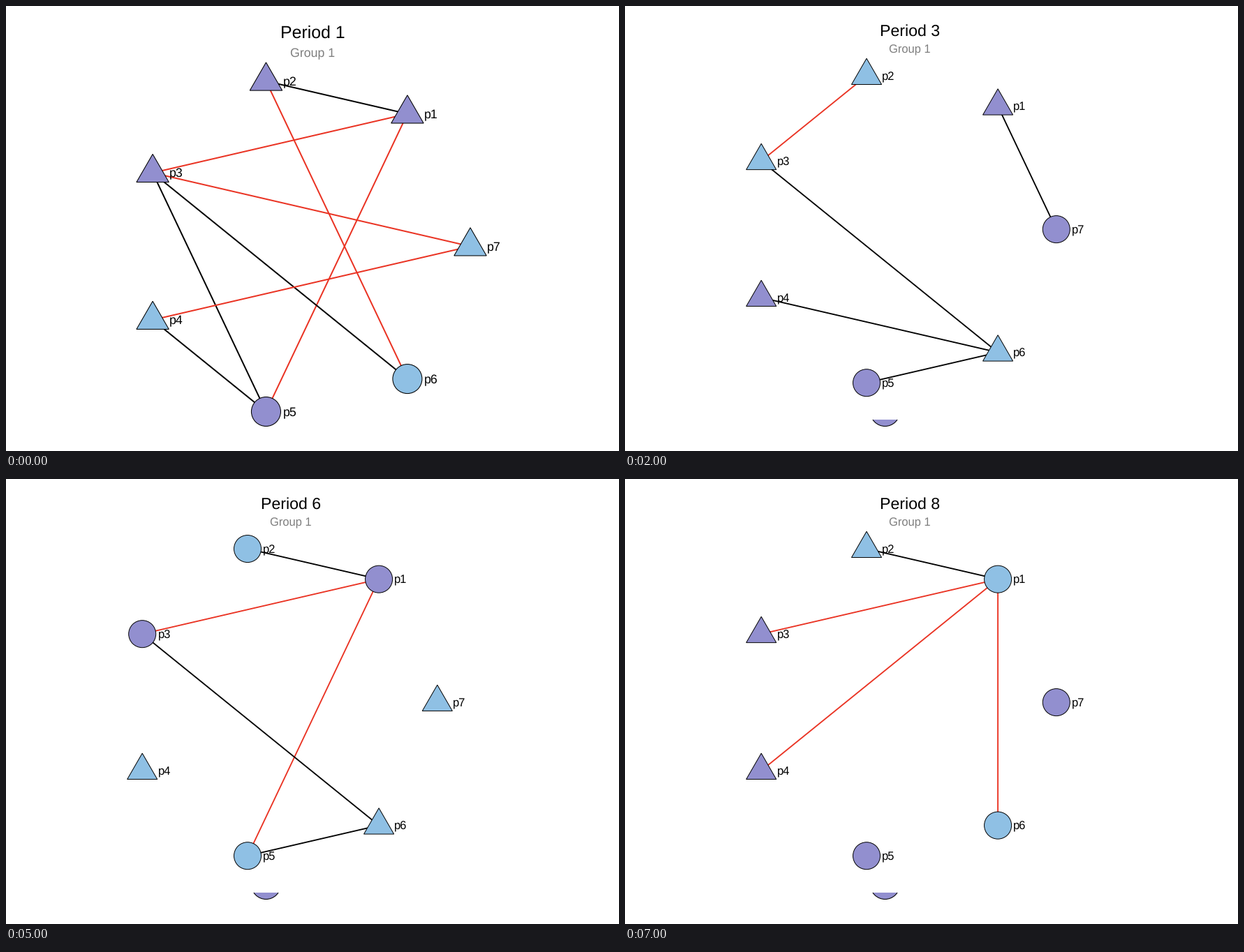
A matplotlib script for the animation above (8000 ms loop, 878 by 638 pixels).

```python
import numpy as np
import matplotlib.pyplot as plt
from matplotlib.animation import ArtistAnimation
from matplotlib.patches import Circle, Polygon, Rectangle

W, H, DPI = 878, 638, 64
PT = 72 / DPI                     # points per pixel
SMALL = 0.929                     # later periods are drawn at this scale
CENTER, RADIUS = (425.7, 344.6), (239.3, 243)
FILL = {"p": "#928fcf", "b": "#8fc0e4"}
RED = "#ea3323"
BLACK_PAIRS = {"12", "17", "35", "36", "45", "46", "56"}

# Nodes p1..p7: p purple, b blue; capital = triangle, small = circle.
PERIODS = [
    ("PPPBpbB", "12 13 15 26 35 36 37 45 47"),
    ("PbPPPPB", "23 24 46"),
    ("PBBPpBp", "17 23 36 46 56"),
    ("PBBpPBP", "17 23 26 36 45 56 57"),
    ("bppBbBb", "12 13 15 24 25 36 37 67"),
    ("pbpBbBB", "12 13 15 36 56"),
    ("pbPpPBB", "12 24 36 37 47"),
    ("bBPPpbp", "12 13 14 16"),
]

plt.rcParams["font.family"] = "Liberation Sans"
plt.rcParams["text.hinting"] = "none"

fig = plt.figure(figsize=(W / DPI, H / DPI), dpi=DPI, facecolor="white")
ax = fig.add_axes([0, 0, 1, 1])
ax.set_xlim(0, W)
ax.set_ylim(H, 0)
ax.axis("off")


def position(k, s):
    a = 2 * np.pi * k / 7
    return (s * (CENTER[0] + RADIUS[0] * np.cos(a)),
            s * (CENTER[1] - RADIUS[1] * np.sin(a)))


def text(x, y, label, size, s, color="black", ha="center"):
    return ax.text(s * x, s * y, label, fontsize=s * size * PT, color=color,
                   ha=ha, va="baseline", zorder=4)


def edge(pair, s):
    (x0, y0), (x1, y1) = (position(int(c), s) for c in pair)
    color = "black" if pair in BLACK_PAIRS else RED
    return ax.plot([x0, x1], [y0, y1], color=color, lw=2 * s * PT,
                   snap=False, zorder=1)[0]


def node(k, kind, s):
    x, y = position(k, s)
    style = dict(facecolor=FILL[kind.lower()], edgecolor="black",
                 lw=1.05 * s * PT, zorder=2)
    if kind.islower():
        shape = Circle((x, y), 21 * s, **style)
    else:
        a = np.radians([-90, 30, 150])
        corners = np.column_stack([x + 26.8 * s * np.cos(a),
                                   y + 26.8 * s * np.sin(a)])
        shape = Polygon(corners, joinstyle="miter", **style)
    return ax.add_patch(shape)


def leftover():
    """Sliver of the first, larger drawing below the smaller canvas."""
    shape = node(5, "p", 1)
    shape.set_clip_path(Rectangle((0, 593), W, H - 593,
                                  transform=ax.transData))
    return shape


def draw(i):
    kinds, pairs = PERIODS[i]
    s = SMALL if i else 1
    parts = [text(439.2, 46.2, f"Period {i + 1}", 24.9, s),
             text(439.2, 73, "Group 1", 17.8, s, "#7f7f7f")]
    parts += [edge(pair, s) for pair in pairs.split()]
    for k, kind in enumerate(kinds, 1):
        parts.append(node(k, kind, s))
        x, y = position(k, 1)
        parts.append(text(x + 24, y + 6.4, f"p{k}", 17.8, s, ha="left"))
    if i:
        parts.append(leftover())
    return parts


anim = ArtistAnimation(fig, [draw(i) for i in range(len(PERIODS))],
                       interval=1000, repeat=True, repeat_delay=0)
plt.show()
```
